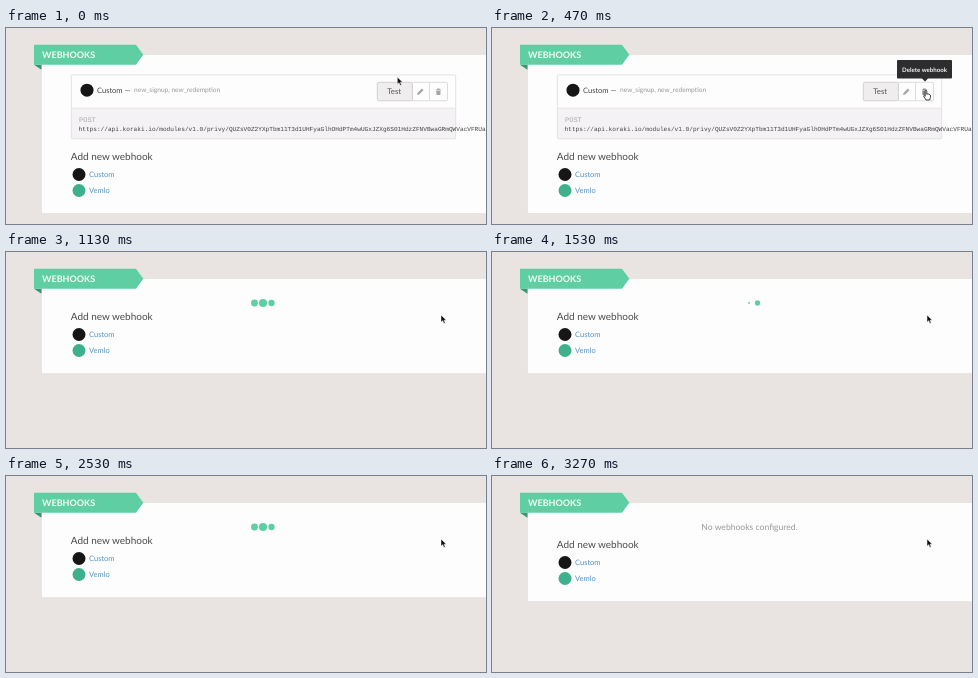
An HTML page that plays this animation: 480x196 px, repeating every 3990 ms.

```html
<!DOCTYPE html>
<html lang="en">
<head>
<meta charset="utf-8">
<title>Deleting a webhook</title>
<style>
html, body { margin: 0; width: 100%; height: 100%; overflow: hidden; background: #e9e4e1; }
svg { display: block; width: 480px; height: 196px; font-family: Lato, "Open Sans", sans-serif; text-rendering: geometricPrecision; }
.mono { font-family: "Liberation Mono", "Courier New", monospace; white-space: pre; }
.link { font-size: 7.5px; fill: #5292c4; }
</style>
</head>
<body>
<svg viewBox="0 0 480 196">
  <rect id="panel" x="35.4" y="26.5" width="460" fill="#fefdfe" stroke="#e2dddb" stroke-width=".6"/>
  <path d="M28 36.7h7.5v5z" fill="#35966f"/>
  <path d="M28 16.7h102l7.3 10-7.3 10H28z" fill="#5fcfa3"/>
  <text x="36" y="29.9" font-size="9" font-weight="700" fill="#f4fcf8">WEBHOOKS</text>

  <g id="hook">
    <path d="M65.3 80.2h384.4v30.6H65.3z" fill="#f4f2f4"/>
    <rect x="65.3" y="46.9" width="384.4" height="63.9" rx="1" fill="none" stroke="#e3e1e2"/>
    <path d="M66 80.2h383" stroke="#e6e4e5"/>
    <circle cx="81" cy="62.2" r="6.5" fill="#161616"/>
    <text x="91" y="64.6" font-size="7.5" fill="#444">Custom —</text>
    <text x="128" y="64.4" font-size="6.6" fill="#999">new_signup, new_redemption</text>
    <rect x="406.3" y="54.3" width="35.2" height="18.5" rx="1.5" fill="#fefdfe" stroke="#dddbdc"/>
    <path d="M423.5 55v17.5" stroke="#dddbdc"/>
    <rect x="371.3" y="54.3" width="35" height="18.5" rx="1.5" fill="#efedee" stroke="#d3d1d2"/>
    <text x="388.2" y="66.2" font-size="7.8" text-anchor="middle" fill="#555">Test</text>
    <path d="M411 67l.6-2.3 4.2-4.2 1.7 1.7-4.2 4.2z" fill="#aaa"/>
    <path id="bin" d="M429.8 61.4h5.2v.9h-5.2zM431.2 60.4h2.4v1h-2.4zM430.2 62.8h4.4l-.3 4.2h-3.8z"/>
    <g class="mono">
      <text x="73" y="94" font-size="7" fill="#aaa">POST</text>
      <text x="72.6" y="103.2" font-size="6.11" fill="#444">https://api.koraki.io/modules/v1.0/privy/QUZsV0Z2YXpTbm11T3d1UHFyaGlhOHdPTm4wUGxJZXg6S01HdzZFNVBwaGRmQWVacVFRUa</text>
    </g>
  </g>

  <g id="add">
    <text x="64.8" y="131.5" font-size="10" fill="#4a4a4a">Add new webhook</text>
    <circle cx="73" cy="146.5" r="6.5" fill="#161616"/>
    <text class="link" x="83" y="149">Custom</text>
    <circle cx="73" cy="162.5" r="6.5" fill="#3eb08c"/>
    <text class="link" x="83" y="165">Vemlo</text>
  </g>

  <g id="dots" fill="#5fcfa3">
    <circle cx="248.5" cy="51"/><circle cx="257" cy="51"/><circle cx="265.5" cy="51"/>
  </g>
  <text id="empty" x="257.5" y="54.3" font-size="8.6" text-anchor="middle" fill="#999">No webhooks configured.</text>

  <g id="tip">
    <path d="M406 32h53q1 0 1 1v16.5q0 1-1 1h-23l-3 3-3-3h-24q-1 0-1-1V33q0-1 1-1z" fill="#2d2d2f"/>
    <text x="432.6" y="43.6" font-size="6.15" font-weight="700" text-anchor="middle" fill="#f4f4f4">Delete webhook</text>
  </g>
  <path id="arrow" d="M0 0v7.2l1.7-1.5 1.2 2.7 1.3-.6-1.2-2.6h2.3z" fill="#111" stroke="#fff" stroke-width=".5"/>
  <path id="hand" d="M433.2 63.3q0-1 .8-1t.8 1v3q.5-.6 1.2 0 .8-.5 1.2.2 1-.3 1.2.7v2.5l-.9 2.3h-3.4l-2.4-3.5q-.3-1 .6-.8l.9.7z" fill="#fff" stroke="#111" stroke-width=".8"/>
</svg>
<script>
const LOOP = 3990, STEP = 1000 / 15, SPIN = 1400, SPIN_START = 750;
const el = id => document.getElementById(id);
const show = (id, on) => el(id).style.display = on ? '' : 'none';
const clamp = v => Math.max(0, Math.min(1, v));
const ease = p => (1 - Math.cos(Math.PI * p)) / 2;

// Grows for 40% of the cycle, shrinks for 40%, then rests.
function bounce(ms) {
  const p = ms % SPIN / SPIN / .4;
  return p < 2 ? ease(p < 1 ? p : 2 - p) : 0;
}

function draw(now) {
  const tick = Math.floor((now % LOOP + 3.4) / STEP);
  const t = tick * STEP;
  const listed = tick < 12, done = tick >= 49, hover = listed && tick >= 5;

  show('hook', listed);
  show('dots', !listed && !done);
  show('empty', done);
  show('hand', hover);
  show('arrow', !hover);

  el('panel').setAttribute('height', listed ? 159 : done ? 99.2 : 95.2);
  el('add').setAttribute('transform', `translate(0 ${listed ? 0 : done ? -60 : -64})`);
  el('bin').setAttribute('fill', hover ? '#888' : '#a5a5a5');
  el('tip').setAttribute('opacity', listed ? clamp((tick - 4) / 3) : 0);

  const p = ease(clamp(tick / 5));
  el('arrow').setAttribute('transform', `translate(${391.3 + 43.7 * p} ${49 + 14 * p})`);

  [...el('dots').children].forEach((dot, i) =>
    dot.setAttribute('r', 4.1 * bounce(Math.max(0, t - SPIN_START) + 320 - 160 * i)));
}

const start = performance.now();
(function frame() {
  draw(performance.now() - start);
  requestAnimationFrame(frame);
})();
</script>
</body>
</html>
```
